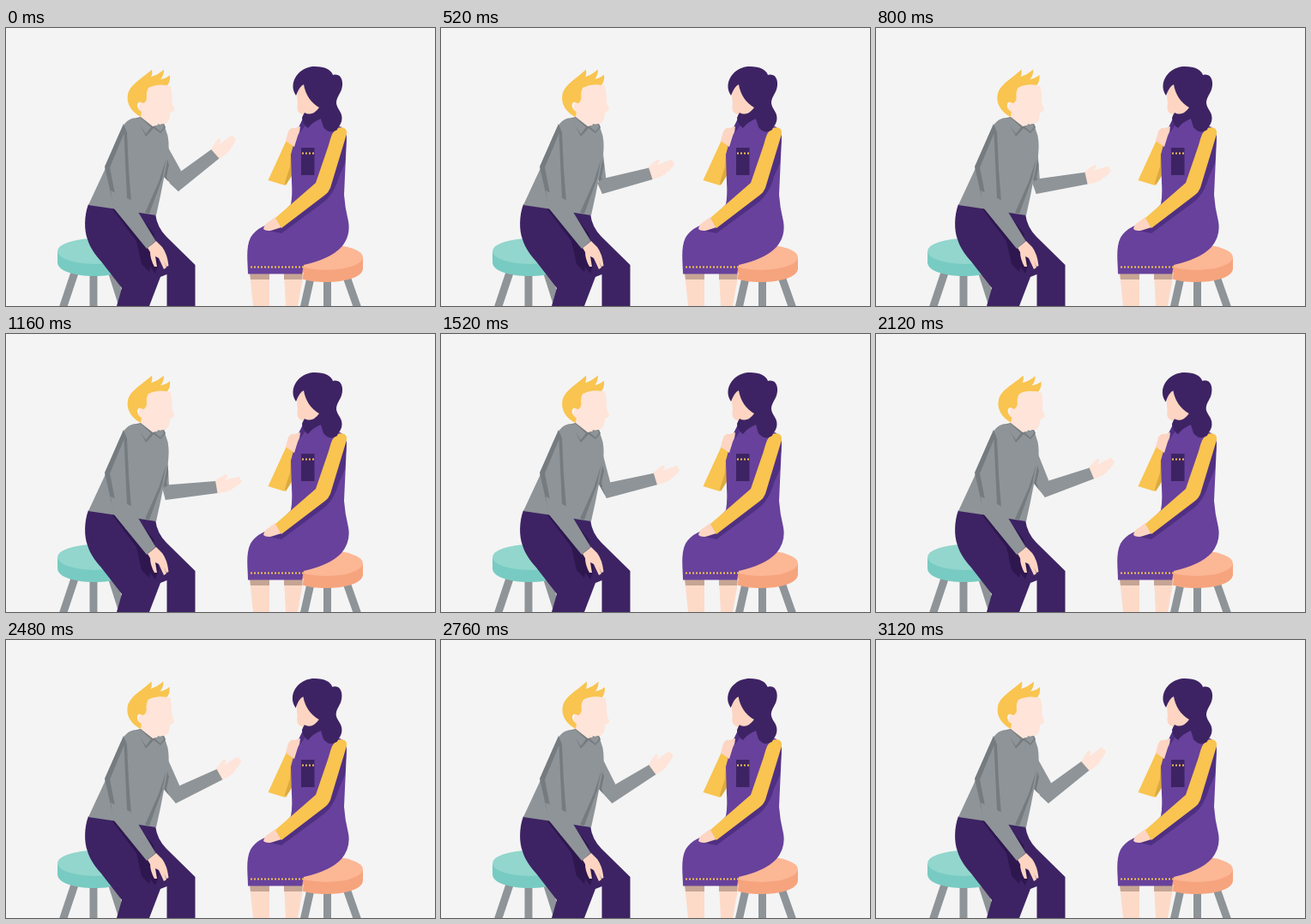
Recreate the animation shown at these times as an HTML page. Size 500 by 325 pixels, loop 3200 ms.

```html
<!DOCTYPE html>
<html lang="en">
<head>
<meta charset="utf-8">
<title>Conversation</title>
<style>
  html, body { margin: 0; width: 100%; height: 100%; overflow: hidden; background: #f4f4f4; }
  svg { display: block; width: 100vw; height: 100vh; }
  .shirt { fill: #8e9498; }
  .fold { fill: #757b7f; }
  .plum { fill: #3d2363; }
  .deep { fill: #2e174f; }
  .dress { fill: #67419b; }
  .shade { fill: #4f2f82; }
  .gold { fill: #f9c44f; }
  .face { fill: #fee4d9; }
  .skin { fill: #fdd5c2; }
  .leg { stroke: #8e9498; stroke-width: 9; }
  .dots { stroke: #f9c44f; stroke-width: 2; stroke-dasharray: 2 2; }
</style>
</head>
<body>
<svg viewBox="0 0 500 325">
  <defs>
    <clipPath id="armClip"><path id="armClipShape"/></clipPath>
  </defs>

  <!-- stools -->
  <path class="leg" d="M80 286L66 328M102 286V328M123 284L137 328"/>
  <path fill="#78cbc2" d="M60 262V274C60 284 80 290 103 290S146 284 146 274V262Z"/>
  <ellipse fill="#92d6cd" cx="103" cy="261" rx="43" ry="15"/>
  <path class="leg" d="M355 292L347 328M374.500 292V328M397 291L410 328"/>
  <path fill="#f6a47e" d="M330 269V281C330 291 350 297 373 297S416 291 416 281V269Z"/>
  <ellipse fill="#fcb795" cx="373" cy="268" rx="43" ry="15"/>

  <!-- man -->
  <path class="plum" d="M96 206C91 220 91 236 95 247C98 257 104 265 111 273L135 304L129 325H167L180 291L187.500 288V325H220.500V277L187 244Q176 233 174 217Z"/>
  <path class="deep" d="M122 209L152 249L158 276L167 285L168 279L174 287L178 275L172 240L150 212Z"/>
  <path id="upperArm" class="shirt"/>
  <path class="fold" clip-path="url(#armClip)" d="M186 146L190 160L187 174L192 187L178 190L176 170Z"/>
  <g id="forearm">
    <g id="hand" class="face">
      <path d="M59-14Q67-18 73-20Q76-20 75-17L71-14L88-15Q91-14 89-12L91-10Q90-8 87-6L76-1Q69 1 60 0Z"/>
    </g>
    <path class="shirt" d="M0 0L61 0L60.500-14L6-17L-2-14Z"/>
  </g>
  <path class="shirt" d="M153 105C146 105 140 108 136.500 115C130 126 123 146 115 166L96 207L130 212L175 219L180 196L188 155Q191 139 188.500 126L184 112Z"/>
  <path class="fold" d="M137 112L138 122L121 163L130 209L126 211L115 162ZM137 112L141 122L143 165L146 203L141 199ZM187 152L182 176L167 217L162 216L178 180Z"/>
  <path class="skin" d="M165 257L175 249L182 256Q188 264 189.500 278L187 279L184 272L187 280L184 282L178 269L174 267L176 279L173 279Q168 270 168 262Z"/>
  <path class="shirt" d="M122 190L125 210L164 258L174.500 249L145.500 201Z"/>
  <g id="manHead">
    <path class="face" d="M158 80L165 71Q178 64 192 68Q194 79 193.500 88L196.500 96L191 100Q191 110 185 112Q181 114 177 112L176 117H170L157 106L154 95Z"/>
    <path class="gold" d="M157 104C146 98 140 88 142 78C144 66 159 59 170 48.500Q171 54 169 57Q177 55 184 48.500Q184 56 180 60Q187 59 191 55Q192 62 188 67Q175 65 166 70Q163 74 164 82Q163 87 160 88Q154 84 153 90Q153 95 158 98Z"/>
  </g>
  <path class="fold" d="M152 105L157 104L171 115L184 112L186 116L180 123L172 117L163 127Z"/>
  <path class="shirt" d="M151 106L157 105L169 116L163 124ZM173 115L183 112L184 116L180 121Z"/>

  <!-- woman -->
  <path fill="#fddac8" d="M284 286H307L307 325H288ZM324 286H347L340 325H326Z"/>
  <path fill="#c7a594" d="M284 286H307V294H285ZM324 286H346L345 294H324Z"/>
  <path class="gold" d="M327 131L305.500 178L325 184L336 164L338 136Z"/>
  <path fill="#dba940" d="M332 145L336 168L326 184L325 181L331 162Z"/>
  <path class="dress" d="M346 106L340 118L332 148L333 180Q334 196 332 206L316 224C304 230 291 234 285 245C279 257 282 275 282 287.500H345L347 277Q378 270 391 256Q402 243 399 226Q395 210 394 195L397 130Q397 114 381 113L366 104Z"/>
  <path class="shade" d="M346 106L364 105L352 109L343 122L339 122ZM302 236L321 240L367 206Q382 196 388 174L395 158L397 124L372 190L319 233Z"/>
  <path class="plum" d="M344 140H359.500V172H344Z"/>
  <path class="dots" d="M345 146.500H360M285 279.500H347"/>
  <path class="skin" d="M329 121Q332 116 336 117L343 115Q343 121 340 126L336 139L326 132Z"/>
  <path class="skin" d="M314 221L321 233L310 236.500Q303 238 300 235Q301 229 307 226Z"/>
  <path class="gold" d="M386 117Q398 114 397 124L378 187Q376 192 372 195L321 234L314 222L361 181L376 137Q380 120 386 117Z"/>
  <g id="womanHead">
    <path class="skin" d="M341 65Q338 77 340 88Q338 97 343 100L350 103L368 100V85L354 64Z"/>
    <path class="plum" d="M338 79Q334 73 334.500 67C336 53 348 45 360 45C372 45 379 49 381 55C391 52 394 63 391 72C389 78 385 81 385 88C386 95 392 98 391.500 106C391 113 387 115 386 119Q377 125 370 116L367 106Q357 110 352 117Q346 113 345 105Q346 102 348 99Q357 104 365 93Q350 84 347 66Q342 68 338 79Z"/>
  </g>
</svg>
<script>
const DURATION = 3200, STEP = 40;
const poseTimes = [0, 520, 1160, 1520, 2120, 2480, 3120];
const track = (values, times = poseTimes) => ({ times, values });

const tracks = {
  elbowX: track([201, 188, 186, 193, 197, 198, 201]),
  elbowY: track([191, 194, 194, 192, 191, 191, 191]),
  forearm: track([-39, -16.3, -7.6, -15, -20.8, -27, -39]),
  hand: track([6, -2, -1, -1, -2, -2, 6]),
  manHead: track([0, -1, 0, -1, 1.5, -0.5, 0]),
  womanHead: track([0, 0, -0.8, -0.8, 0], [0, 1700, 2120, 2480, 3120])
};

// Monotone cubic interpolation: smooth, without overshoot at turning points.
function sample({ times, values }, t) {
  const last = times.length - 2;
  const slope = i => (values[i + 1] - values[i]) / (times[i + 1] - times[i]);
  const tangent = i => {
    if (i < 1 || i > last) return 0;
    const a = slope(i - 1), b = slope(i);
    return a * b > 0 ? 2 * a * b / (a + b) : 0;
  };
  let i = 0;
  while (i < last && t >= times[i + 1]) i++;
  const h = times[i + 1] - times[i], u = (t - times[i]) / h, v = 1 - u;
  return v * v * (1 + 2 * u) * values[i] + u * u * (3 - 2 * u) * values[i + 1]
    + h * u * v * (v * tangent(i) - u * tangent(i + 1));
}

const $ = id => document.getElementById(id);
const setTransform = (id, value) => $(id).setAttribute('transform', value);

function draw(time) {
  const t = Math.min(Math.floor(time / STEP) * STEP, DURATION - 2 * STEP);
  const pose = {};
  for (const name in tracks) pose[name] = sample(tracks[name], t);

  const { elbowX: x, elbowY: y, forearm: angle } = pose;
  const rad = angle * Math.PI / 180, cos = Math.cos(rad), sin = Math.sin(rad);
  const creaseX = 3.5 - 0.36 * angle, creaseY = -17;
  const crease = [x + creaseX * cos - creaseY * sin, y + creaseX * sin + creaseY * cos];
  const arm = `M174 130L188 138L${crease}L${x} ${y}L182 172L174 165Z`;

  $('upperArm').setAttribute('d', arm);
  $('armClipShape').setAttribute('d', arm);
  setTransform('forearm', `translate(${x} ${y}) rotate(${angle})`);
  setTransform('hand', `rotate(${pose.hand} 60 -7)`);
  setTransform('manHead', `rotate(${pose.manHead} 168 112)`);
  setTransform('womanHead', `rotate(${pose.womanHead} 365 110)`);
}

const start = performance.now();
function tick() {
  draw((performance.now() - start) % DURATION);
  requestAnimationFrame(tick);
}
tick();
</script>
</body>
</html>
```
